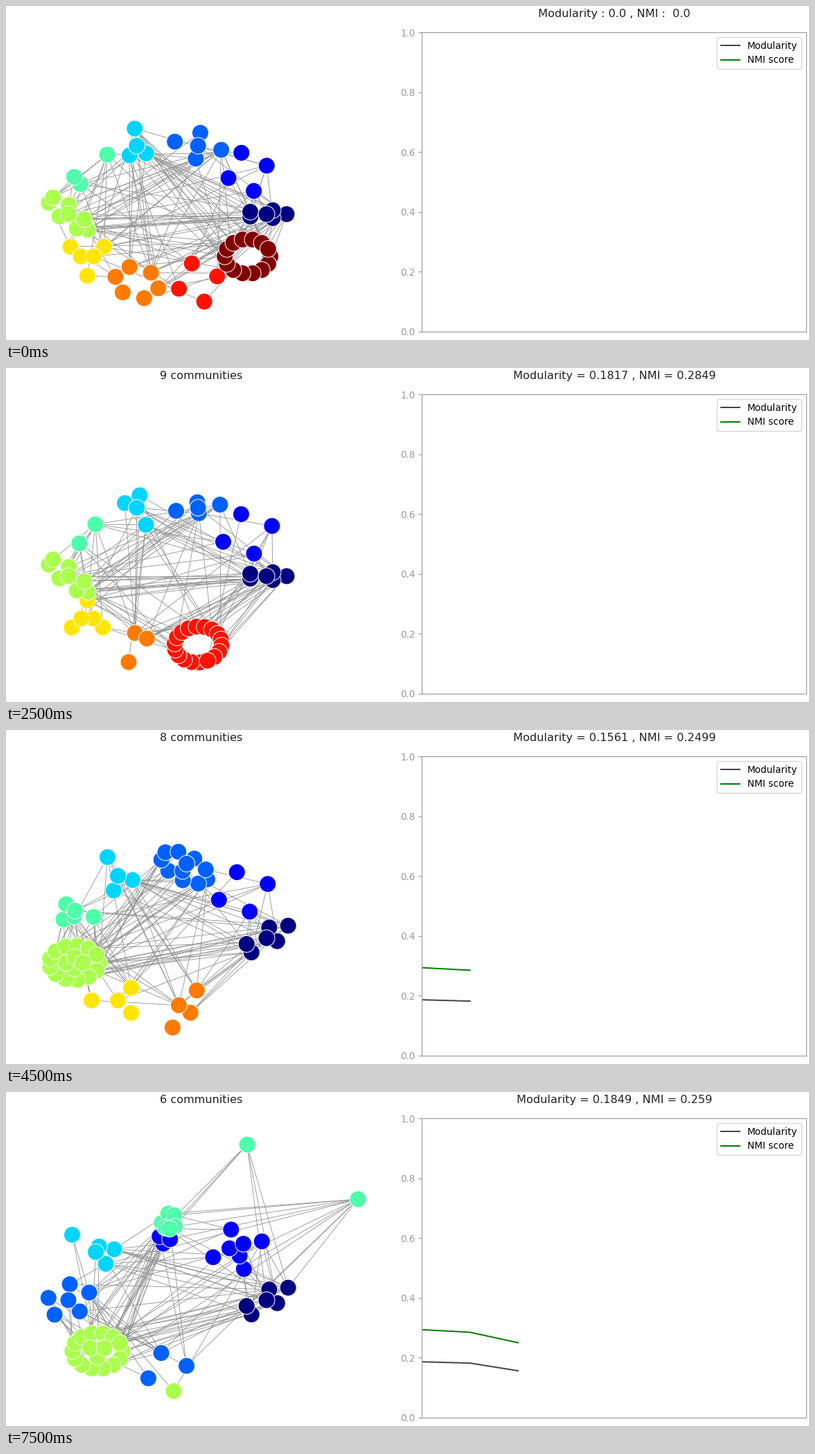
Write a matplotlib script that moves like this. It is 1159 px wide and 483 px high and loops after 8 s.

```python
import random
from math import cos, dist, pi, radians, sin, sqrt
import matplotlib.pyplot as plt
from matplotlib.animation import FuncAnimation
from matplotlib.collections import LineCollection

W, H, DPI = 1159, 483, 128
PX = 72 / DPI  # points per pixel
GROUPS = "NBZCQLYORD"
COLORS = {g: plt.cm.jet(i / 9) for i, g in enumerate(GROUPS)}
STRONG = "NB NC NL NO NR ND CO CD ZL ZB QL QY XN XZ".split()


def ellipse(center, count, rx, ry, tilt, start=0.0):
    """Evenly spaced points on an ellipse turned by tilt degrees."""
    turn = radians(tilt)
    points = []
    for k in range(count):
        a = start + 2 * pi * k / count
        u, v = rx * cos(a), ry * sin(a)
        points.append((center[0] + u * cos(turn) - v * sin(turn),
                       center[1] + u * sin(turn) + v * cos(turn)))
    return points


def cluster(center, outer, inner, rx, ry, tilt):
    scale = 0.33 if inner > 1 else 0
    return (ellipse(center, outer, rx, ry, tilt)
            + ellipse(center, inner, rx * scale, ry * scale, tilt, pi / 2))


def arrange(slots, shapes):
    """Put each cluster on its own slot of one large ellipse."""
    layout = {}
    for group, shape in shapes.items():
        angle = 2 * pi * GROUPS.index(group) / slots
        layout[group] = cluster((233 + 143 * cos(angle), 301 - 104 * sin(angle)), *shape)
    return layout


# Cluster shape: outer nodes, inner nodes, two radii, tilt.
FLAT, SLOPED = (5, 1, 29, 6, 0), (5, 1, 36, 12, -30)
SQUARE, WIDE = (4, 0, 29, 29, -18), (4, 0, 37, 30, -18)
LEAF = (7, 1, 36, 11, 39)

FIRST = arrange(10, {
    "N": FLAT, "B": SQUARE, "Z": (4, 1, 34, 19, 10), "C": (3, 1, 25, 14, -97),
    "Q": (3, 0, 38, 8, -41), "Y": (3, 2, 28, 28, 90), "L": LEAF,
    "O": (6, 0, 32, 22, 15), "R": SQUARE, "D": (14, 0, 33, 25, 0)})
SECOND = arrange(10, {
    "N": FLAT, "B": WIDE, "Z": (4, 1, 32, 8, -8), "C": (3, 1, 28, 14, 62),
    "Q": (2, 0, 18, 0, 130), "Y": (3, 2, 26, 26, -90), "L": LEAF,
    "O": (3, 0, 28, 11, 115), "R": (18, 0, 26, 34, 85)})
THIRD = arrange(9, {
    "N": SLOPED, "B": WIDE, "Z": (9, 2, 37, 18, 28), "C": (3, 1, 31, 18, -119),
    "Q": (3, 2, 28, 13, 10), "L": (13, 4, 36, 25, 0), "Y": (3, 1, 38, 21, 180),
    "O": (4, 0, 32, 10, -57)})
SHAPES = {
    "N": SLOPED, "B": (4, 3, 37, 30, -18), "Z": (9, 2, 33, 9, 17),
    "C": (3, 2, 42, 14, -150), "Q": (5, 1, 35, 16, 20), "L": (14, 3, 36, 26, 0),
    "Y": (4, 0, 34, 29, 31)}
FOURTH = arrange(8, SHAPES)
FIFTH = arrange(8, {**SHAPES, "Z": (7, 2, 23, 10, 105), "Q": (5, 1, 32, 22, -20),
                    "Y": SQUARE})
FIFTH["X"] = [(508, 155), (348, 76)]


def link(layout):
    """Seeded edges between clusters; hubs come first, near partners win."""
    rng = random.Random(7)
    segments = []
    names = sorted(layout, key="XNBZCQLYORD".index)
    for k, a in enumerate(names):
        for b in names[k + 1:]:
            density = 1.4 if a + b in STRONG else 0.3
            count = round(density * sqrt(len(layout[a]) * len(layout[b])))
            pairs = set()
            while len(pairs) < count:
                p = layout[a][int(len(layout[a]) * rng.random() ** 1.4)]
                q = min(rng.choices(layout[b], k=3), key=lambda point: dist(p, point))
                pairs.add((p, q))
            segments += sorted(pairs)
    return segments


def node_colors(layout, recolor):
    colors = []
    for group, points in layout.items():
        letters = recolor.get(group, group)
        if len(letters) == 1:
            letters *= len(points)
        colors += [COLORS[c] for c in letters]
    return colors


MODULARITY = [0.1861, 0.1817, 0.1561, 0.1849]
NMI = [0.2935, 0.2849, 0.2499, 0.259]

# layout, recoloured clusters, community count, score index
STATES = [
    (FIRST, {}, None, 0),
    (FIRST, {}, 10, 0),
    (FIRST, {"D": "R"}, 9, 0),
    (SECOND, {}, 9, 1),
    (SECOND, {"Z": "ZZZQQ", "Q": "QO", "L": "Z", "Y": "YYYQQ", "R": "Y" + "L" * 17}, 8, 1),
    (THIRD, {}, 8, 2),
    (THIRD, {"O": "BBBC"}, 7, 2),
    (FOURTH, {}, 7, 3),
    (FIFTH, {"X": "Q", "Z": "BBQQQQBQQ", "Q": "Z", "Y": "ZLZZ"}, 6, 3),
]

plt.rcParams["font.family"] = "DejaVu Sans"
fig = plt.figure(figsize=(W / DPI, H / DPI), dpi=DPI, facecolor="white")

left, right, top, bottom = 600.4, 1154.8, 38.3, 470.6
chart = fig.add_axes([left / W, 1 - bottom / H, (right - left) / W, (bottom - top) / H])
chart.set(xlim=(0, 8), ylim=(0, 1), xticks=[])
chart.tick_params(axis="y", color="#999999", labelcolor="#999999",
                  labelsize=13.5 * PX, length=4.7 * PX, pad=4.7 * PX, width=1.1 * PX)
for spine in chart.spines.values():
    spine.set(color="#999999", linewidth=1.1 * PX)
modularity_line, = chart.plot([], [], color="#444444", lw=2 * PX, label="Modularity")
nmi_line, = chart.plot([], [], color="green", lw=2 * PX, label="NMI score")
legend = chart.legend(loc="upper right", fontsize=13.6 * PX)
legend.get_frame().set_linewidth(1.35 * PX)

stage = fig.add_axes([0, 0, 1, 1])
stage.set(xlim=(0, W), ylim=(H, 0))
stage.axis("off")
edges = stage.add_collection(
    LineCollection([], colors="#919191", linewidths=0.85 * PX, zorder=1))
nodes = stage.scatter([], [], s=(24 * PX) ** 2, edgecolors="white",
                      linewidths=1 * PX, zorder=2)
title_style = dict(ha="center", va="baseline", fontsize=16.15 * PX, color="#222222")
count_title = stage.text(281.5, 16.3, "", **title_style)
score_title = stage.text(878, 16.3, "", **title_style)


def update(frame):
    layout, recolor, count, score = STATES[(frame + 1) // 2]
    nodes.set_offsets([p for points in layout.values() for p in points])
    nodes.set_facecolors(node_colors(layout, recolor))
    edges.set_segments(link(layout))
    if count is None:
        count_title.set_text("")
        score_title.set_text("Modularity : 0.0 , NMI :  0.0")
    else:
        count_title.set_text(f"{count} communities")
        score_title.set_text(f"Modularity = {MODULARITY[score]} , NMI = {NMI[score]}")
    modularity_line.set_data(range(score), MODULARITY[:score])
    nmi_line.set_data(range(score), NMI[:score])
    return nodes, edges, count_title, score_title, modularity_line, nmi_line


anim = FuncAnimation(fig, update, frames=16, interval=500, repeat=True, blit=False)
plt.show()
```
